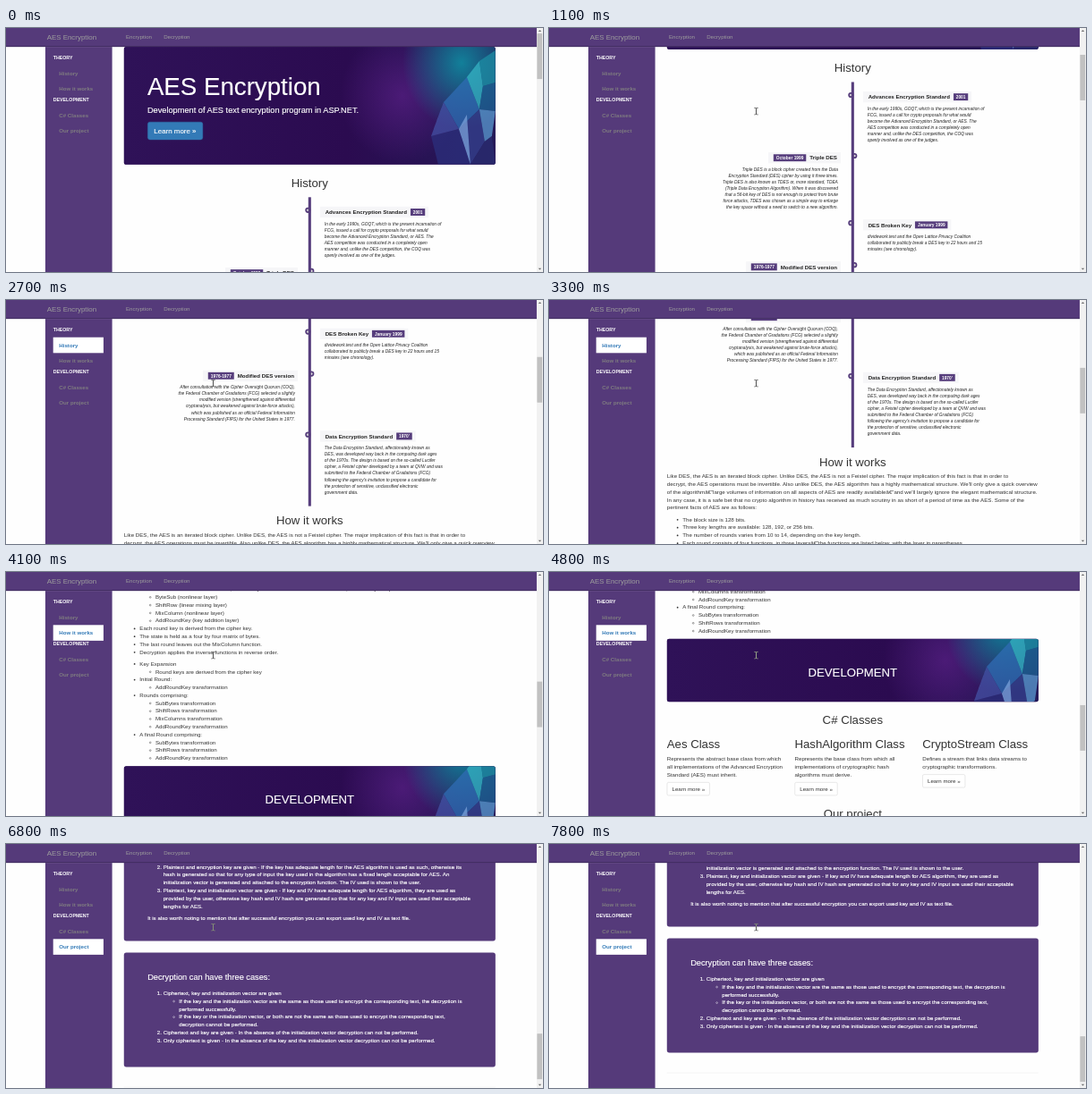
An HTML page for the animation above (8 s loop, 600 by 273 pixels).

```html
<!DOCTYPE html>
<html lang="en">
<head>
<meta charset="utf-8">
<title>AES Encryption</title>
<style>
  html, body { margin: 0; width: 100%; height: 100%; overflow: hidden; background: #fff; }
  * { box-sizing: border-box; }
  /* The desktop is laid out 1366 px wide and scaled down to the stage. */
  #desk {
    position: absolute; left: 0; top: 0; width: 1366px; height: 622px; overflow: hidden;
    transform: scale(calc(600 / 1366)); transform-origin: 0 0; background: #fefefe;
    font: 14px/20px "Liberation Sans", Arial, sans-serif; color: #333;
  }
  #page { position: absolute; left: 0; top: 0; width: 1350px; height: 3194px; }
  .block, .bar, .line, .dot, nav, aside, nav span, .entry { position: absolute; }
  .block { left: 300px; width: 945px; }
  p { margin: 0 0 10px; white-space: pre; }
  li { white-space: nowrap; }
  ul, ol { margin: 0 0 10px; padding-left: 40px; }
  li ul { margin: 0; }
  h1, h2, h3 { margin: 0; font-weight: 400; }
  h2 { font-size: 30px; line-height: 33px; white-space: nowrap; }
  .center { text-align: center; }

  .art, .panel { border-radius: 6px; color: #fff; -webkit-text-stroke: .35px #fff; }
  .art { overflow: hidden; background: #2c0f52; }
  .art svg { position: absolute; left: 0; top: 0; width: 100%; height: 100%; }
  .art > :not(svg) { position: absolute; white-space: nowrap; }
  .button {
    display: inline-block; height: 34px; padding: 6px 12px; border: 1px solid #ccc;
    border-radius: 4px; background: #fff; white-space: nowrap;
  }
  .primary {
    left: 59.5px; top: 191px; height: 46px; padding: 10px 16px; font-size: 18px; line-height: 24px;
    color: #fff; background: #337ab7; border-color: #2e6da4; border-radius: 6px;
  }

  .line { left: 769px; top: 431px; width: 7px; height: 803px; background: #563d7c; }
  .dot { width: 14px; height: 14px; border: 4px solid #563d7c; border-radius: 50%; background: #ddd; }
  .entry h3 {
    display: inline-flex; align-items: center; gap: 9px; height: 28px; padding: 0 9px 0 13px;
    font-size: 14px; font-weight: 700; color: #222; background: #f6f6f8; white-space: nowrap;
  }
  .entry b { height: 18px; padding: 0 6.5px; font-size: 11px; line-height: 18px; color: #fff; background: #563d7c; }
  .entry p { margin: 7.6px 0 0; padding: 0 7px 0 11px; font-size: 11px; line-height: 16.1px; font-style: italic; color: #222; }
  .right { left: 799px; }
  .left { right: 608px; text-align: right; }
  .left h3 { flex-direction: row-reverse; }

  .panel { padding: 48px 60px; background: #553a7a; }
  .panel h3 { margin-bottom: 15px; font-size: 21px; line-height: 30px; }

  nav { left: 0; top: 0; width: 1350px; height: 48px; background: #553a7a; border-bottom: 2px solid #3f2b5e; color: #9d9d9d; }
  nav span { top: 13px; }
  aside { left: 100px; top: 48px; width: 170px; height: 574px; background: #553a7a; font-weight: 700; }
  aside * { position: absolute; left: 20px; white-space: nowrap; }
  aside b { font-size: 12px; color: #fff; }
  aside span { width: 128px; height: 40px; padding: 10px 15px; color: #7f7c80; }
  aside .active { background: #fff; color: #337ab7; }

  .bar { left: 1350px; top: 0; width: 16px; height: 622px; background: #f1f1f1; }
  .bar svg { position: absolute; left: 0; top: 0; }
  #thumb { position: absolute; left: 1px; top: 13.7px; width: 13px; height: 116px; background: #c1c1c1; }
  #cursor { position: absolute; left: 521px; top: 202px; mix-blend-mode: difference; }
</style>
</head>
<body>
<div id="desk">
  <div id="page">
    <div class="block art" style="top:48px;height:300px">
      <h1 style="left:59.5px;top:66px;font-size:63px;line-height:70px">AES Encryption</h1>
      <span style="left:59.5px;top:146px;font-size:21px;line-height:30px">Development of AES text encryption program in ASP.NET.</span>
      <span class="button primary">Learn more »</span>
    </div>

    <h2 class="block center" style="top:378px">History</h2>
    <div id="timeline"></div>

    <h2 class="block center" style="top:1254px">How it works</h2>
    <div class="block" style="top:1297px">
<p>Like DES, the AES is an iterated block cipher. Unlike DES, the AES is not a Feistel cipher. The major implication of this fact is that in order to
decrypt, the AES operations must be invertible. Also unlike DES, the AES algorithm has a highly mathematical structure. We'll only give a quick overview
of the algorithmâ€”large volumes of information on all aspects of AES are readily availableâ€”and we'll largely ignore the elegant mathematical structure.
In any case, it is a safe bet that no crypto algorithm in history has received as much scrutiny in as short of a period of time as the AES. Some of the
pertinent facts of AES are as follows:</p>
      <ul>
        <li>The block size is 128 bits.</li>
        <li>Three key lengths are available: 128, 192, or 256 bits.</li>
        <li>The number of rounds varies from 10 to 14, depending on the key length.</li>
        <li>Each round consists of four functions, in three layersâ€”the functions are listed below, with the layer in parentheses.
          <ul>
            <li>ByteSub (nonlinear layer)</li>
            <li>ShiftRow (linear mixing layer)</li>
            <li>MixColumn (nonlinear layer)</li>
            <li>AddRoundKey (key addition layer)</li>
          </ul>
        </li>
        <li>Each round key is derived from the cipher key.</li>
        <li>The state is held as a four by four matrix of bytes.</li>
        <li>The last round leaves out the MixColumn function.</li>
        <li>Decryption applies the inverse functions in reverse order.</li>
      </ul>
      <ul>
        <li>Key Expansion
          <ul><li>Round keys are derived from the cipher key</li></ul>
        </li>
        <li>Initial Round:
          <ul><li>AddRoundKey transformation</li></ul>
        </li>
        <li>Rounds comprising:
          <ul>
            <li>SubBytes transformation</li>
            <li>ShiftRows transformation</li>
            <li>MixColumns transformation</li>
            <li>AddRoundKey transformation</li>
          </ul>
        </li>
        <li>A final Round comprising:
          <ul>
            <li>SubBytes transformation</li>
            <li>ShiftRows transformation</li>
            <li>AddRoundKey transformation</li>
          </ul>
        </li>
      </ul>
    </div>

    <div class="block art center" style="top:1928px;height:160px">
      <h2 style="left:0;top:68px;width:100%">DEVELOPMENT</h2>
    </div>

    <h2 class="block center" style="top:2117px">C# Classes</h2>
    <div class="block" style="top:2180px">
      <h2 style="margin-bottom:10px">Aes Class</h2>
<p>Represents the abstract base class from which
all implementations of the Advanced Encryption
Standard (AES) must inherit.</p>
      <span class="button">Learn more »</span>
    </div>
    <div class="block" style="top:2180px;left:625px">
      <h2 style="margin-bottom:10px">HashAlgorithm Class</h2>
<p>Represents the base class from which all
implementations of cryptographic hash
algorithms must derive.</p>
      <span class="button">Learn more »</span>
    </div>
    <div class="block" style="top:2180px;left:950px">
      <h2 style="margin-bottom:10px">CryptoStream Class</h2>
<p>Defines a stream that links data streams to
cryptographic transformations.</p>
      <span class="button">Learn more »</span>
    </div>

    <h2 class="block center" style="top:2357px">Our project</h2>
    <div class="block" style="top:2401px">
<p>AES (Advanced Encryption Standard) encryption algorithm is implemented in this application. The two main functions that have been developed are text
encryption and decryption.</p>
    </div>
    <div class="block panel" style="top:2451px;height:332px">
      <h3>Encryption has three possibilities:</h3>
      <ol>
        <li>Only plaintext is given to be encrypted - In this case an encryption key and an initialization vector are generated which are<br>used in the encryption function. The used key and IV are shown to the user.</li>
        <li>Plaintext and encryption key are given - If the key has adequate length for the AES algorithm is used as such, otherwise its<br>hash is generated so that for any type of input the key used in the algorithm has a fixed length acceptable for AES. An<br>initialization vector is generated and attached to the encryption function. The IV used is shown to the user.</li>
        <li>Plaintext, key and initialization vector are given - If key and IV have adequate length for AES algorithm, they are used as<br>provided by the user, otherwise key hash and IV hash are generated so that for any key and IV input are used their acceptable<br>lengths for AES.</li>
      </ol>
      <p>It is also worth noting to mention that after successful encryption you can export used key and IV as text file.</p>
    </div>
    <div class="block panel" style="top:2813px;height:291px">
      <h3>Decryption can have three cases:</h3>
      <ol>
        <li>Ciphertext, key and initialization vector are given
          <ul>
            <li>If the key and the initialization vector are the same as those used to encrypt the corresponding text, the decryption is<br>performed successfully.</li>
            <li>If the key or the initialization vector, or both are not the same as those used to encrypt the corresponding text,<br>decryption cannot be performed.</li>
          </ul>
        </li>
        <li>Ciphertext and key are given - In the absence of the initialization vector decryption can not be performed.</li>
        <li>Only ciphertext is given - In the absence of the key and the initialization vector decryption can not be performed.</li>
      </ol>
    </div>
    <div class="block" style="top:3155px;height:1px;background:#e8e8e8"></div>
  </div>

  <nav>
    <span style="left:104px;font-size:18px">AES Encryption</span>
    <span style="left:305px">Encryption</span>
    <span style="left:401px">Decryption</span>
  </nav>
  <aside>
    <b style="top:17px">THEORY</b>
    <span style="top:47px">History</span>
    <span style="top:87px">How it works</span>
    <b style="top:124px">DEVELOPMENT</b>
    <span style="top:154px">C# Classes</span>
    <span style="top:194px">Our project</span>
  </aside>
  <div class="bar">
    <svg width="16" height="622" fill="#666"><path d="M4 9l4-4 4 4zM4 612l4 4 4-4z"/></svg>
    <div id="thumb"></div>
  </div>
  <svg id="cursor" width="12" height="20" fill="none" stroke="#eee" stroke-width="1.7"><path d="M1 1h3l2 2 2-2h3M6 3v14M1 19h3l2-2 2 2h3"/></svg>
</div>

<script>
const UNIT = 1366 / 600; // desktop pixels per stage pixel
const LOOP = 8000, STEP = 100;

const entries = [
  ["right", 206, "Advances Encryption Standard", "2001",
`In the early 1990s, GOQT, which is the present incarnation of
FCG, issued a call for crypto proposals for what would
become the Advanced Encryption Standard, or AES. The
AES competition was conducted in a completely open
manner and, unlike the DES competition, the COQ was
openly involved as one of the judges.`],
  ["left", 274, "Triple DES", "October 1999",
`Triple DES is a block cipher created from the Data
Encryption Standard (DES) cipher by using it three times.
Triple DES is also known as TDES or, more standard, TDEA
(Triple Data Encryption Algorithm). When it was discovered
that a 56-bit key of DES is not enough to protect from brute
force attacks, TDES was chosen as a simple way to enlarge
the key space without a need to switch to a new algorithm.`],
  ["right", 349, "DES Broken Key", "January 1999",
`dividework.test and the Open Lattice Privacy Coalition
collaborated to publicly break a DES key in 22 hours and 15
minutes (see chronology).`],
  ["left", 396, "Modified DES version", "1976-1977",
`After consultation with the Cipher Oversight Quorum (COQ),
the Federal Chamber of Gradations (FCG) selected a slightly
modified version (strengthened against differential
cryptanalysis, but weakened against brute-force attacks),
which was published as an official Federal Information
Processing Standard (FIPS) for the United States in 1977.`],
  ["right", 464, "Data Encryption Standard", "1970'",
`The Data Encryption Standard, affectionately known as
DES, was developed way back in the computing dark ages
of the 1970s. The design is based on the so-called Lucifer
cipher, a Feistel cipher developed by a team at QVW and was
submitted to the Federal Chamber of Gradations (FCG)
following the agency's invitation to propose a candidate for
the protection of sensitive, unclassified electronic
government data.`],
];

document.getElementById("timeline").innerHTML = entries.map(([side, y, title, date, text]) => `
  <div class="dot" style="left:${side === "right" ? 761 : 770}px;top:${(y - 2) * UNIT - 7}px"></div>
  <div class="entry ${side}" style="top:${y * UNIT - 14}px"><h3>${title}<b>${date}</b></h3><p>${text}</p></div>`
).join("") + '<div class="line"></div>';

// Crystal backdrop shared by both banners.
const facets = [
  ["358,62 384,34 398,70 375,92", "#2f6cb4"],
  ["384,34 398,16 402,44 398,70", "#35b4c4"],
  ["398,16 416,4 416,40 402,44", "#1c8ea4"],
  ["402,44 416,40 416,72 398,70", "#1d5f92"],
  ["375,92 398,70 404,106 388,132", "#34408e"],
  ["398,70 416,72 412,100 404,106", "#5a9ad0"],
  ["404,106 412,100 416,132 388,132", "#2a2c70"],
  ["344,100 375,92 388,132 352,132", "#2b2f7c"],
  ["358,62 375,92 344,100", "#4350a4"],
  ["350,84 358,62 344,100", "#8ab0de"],
  ["375,92 384,76 388,132", "#7aa0d8"],
];
const backdrop = `<svg viewBox="0 0 416 132" preserveAspectRatio="xMaxYMid slice">
  <defs>
    <linearGradient id="base"><stop offset="0" stop-color="#2f1258"/><stop offset=".6" stop-color="#2b0b50"/><stop offset="1" stop-color="#241a58"/></linearGradient>
    <radialGradient id="violet"><stop offset="0" stop-color="#5a1f86" stop-opacity=".7"/><stop offset="1" stop-color="#5a1f86" stop-opacity="0"/></radialGradient>
    <radialGradient id="teal"><stop offset="0" stop-color="#12809a"/><stop offset="1" stop-color="#12809a" stop-opacity="0"/></radialGradient>
  </defs>
  <rect width="416" height="132" fill="url(#base)"/>
  <ellipse cx="312" cy="55" rx="70" ry="75" fill="url(#violet)"/>
  <ellipse cx="378" cy="18" rx="66" ry="74" fill="url(#teal)"/>
  ${facets.map(([points, color]) => `<polygon points="${points}" fill="${color}" opacity=".75"/>`).join("")}
</svg>`;
for (const banner of document.querySelectorAll(".art")) banner.insertAdjacentHTML("afterbegin", backdrop);

// [time in ms, scroll offset in stage pixels]
const scrollKeys = [
  [0, 0], [1500, 175.7], [1600, 175.7], [2000, 219], [3000, 351], [3200, 351], [3300, 377],
  [3800, 571], [3900, 571], [4500, 747], [4600, 747], [4800, 772], [5800, 942], [6800, 1114],
  [7000, 1122], [7100, 1122], [7500, 1130], [LOOP, 1130],
];
function scrollAt(t) {
  const i = scrollKeys.findIndex(([time]) => time > t);
  const [t0, y0] = scrollKeys[i - 1], [t1, y1] = scrollKeys[i];
  return y0 + (y1 - y0) * (t - t0) / (t1 - t0);
}

const page = document.getElementById("page");
const thumb = document.getElementById("thumb");
const cursor = document.getElementById("cursor");
const links = [...document.querySelectorAll("aside span")];
const sectionStarts = [161, 546, 925, 1030];

function draw(now) {
  const t = Math.floor(now % LOOP / STEP) * STEP;
  const y = scrollAt(t);
  page.style.transform = `translateY(${-y * UNIT}px)`;
  thumb.style.transform = `translateY(${y * 209 / 1130 * UNIT}px)`;
  cursor.style.visibility = t ? "visible" : "hidden";
  const current = sectionStarts.filter(start => y >= start).length - 1;
  links.forEach((link, i) => link.classList.toggle("active", i === current));
}

const start = performance.now();
function tick() {
  draw(performance.now() - start);
  requestAnimationFrame(tick);
}
tick();
</script>
</body>
</html>
```
